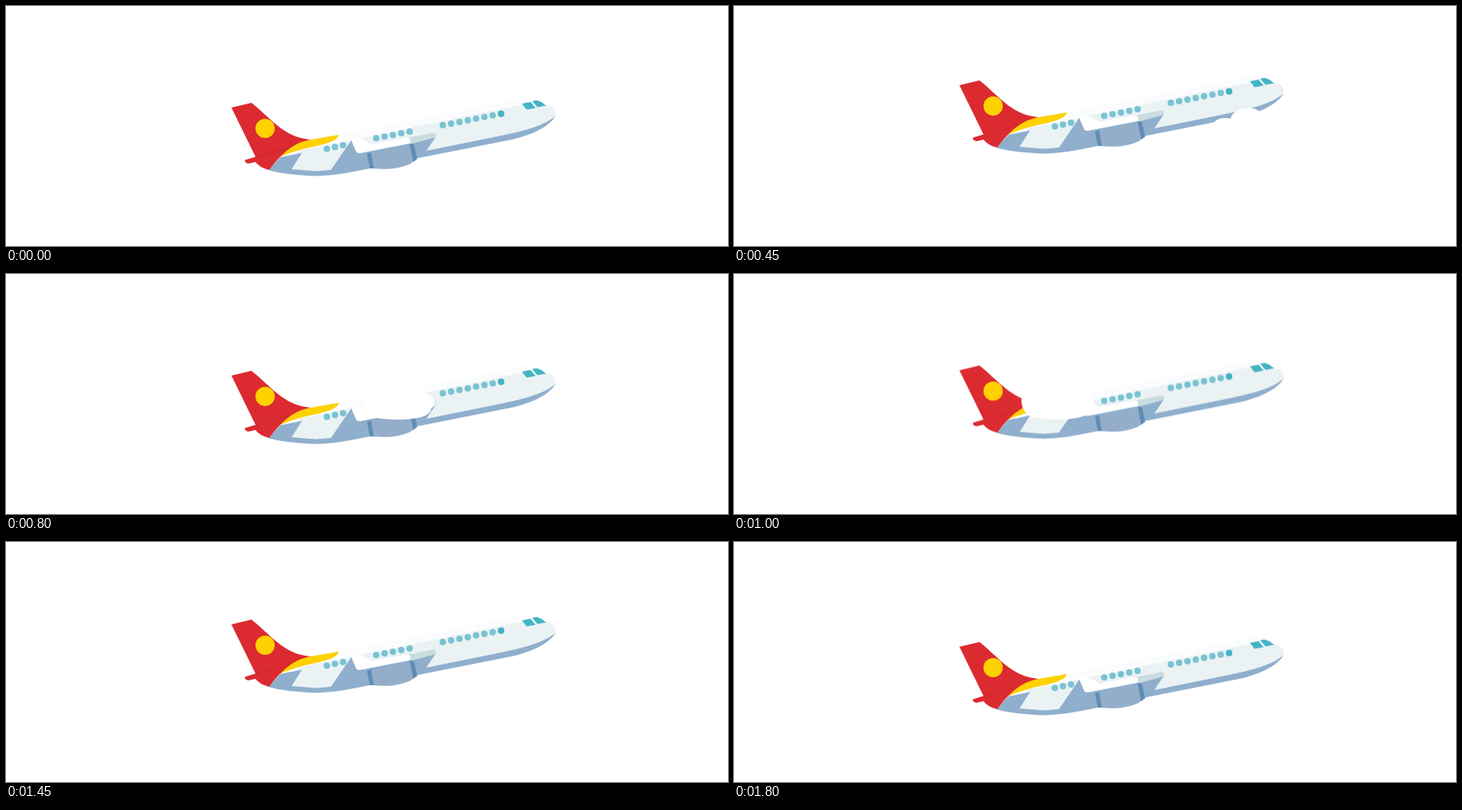
Recreate the animation shown at these times as an HTML page without scripts. Size 900 by 300 pixels, loop 1850 ms.

```html
<!DOCTYPE html>
<html lang="en">
<head>
<meta charset="utf-8">
<title>Climbing plane</title>
<style>
  html, body { margin: 0; width: 100%; height: 100%; overflow: hidden; background: #fff; }
  svg { display: block; width: 900px; height: 300px; }

  .plane { animation: bob 1850ms infinite; }
  .cloud { fill: #fff; animation: drift 1850ms steps(37) infinite; }

  .white { fill: #fbfcfd; }
  .light { fill: #eaf2f4; }
  .blue { fill: #8fafcd; }
  .engine { fill: #94aeca; }
  .dark { fill: #5f8db5; }
  .red { fill: #dc2a31; }
  .yellow { fill: #fed100; }
  .teal { fill: #45b4c4; }
  .windows { fill: none; stroke: #79c3d2; stroke-width: 8; stroke-linecap: round; stroke-dasharray: 0 1; }

  /* 37 ticks of 50 ms */
  @keyframes bob {
    0% { transform: translateY(0); animation-timing-function: steps(8); }
    21.6216% { transform: translateY(-28px); animation-timing-function: steps(1); }
    24.3243% { transform: translateY(-28px); animation-timing-function: steps(8); }
    45.9459% { transform: translateY(4px); animation-timing-function: steps(9); }
    70.2703% { transform: translateY(-28px); animation-timing-function: steps(1); }
    75.6757% { transform: translateY(-28px); animation-timing-function: steps(8); }
    97.2973%, 100% { transform: translateY(4px); animation-timing-function: steps(1); }
  }
  @keyframes drift {
    from { transform: translateX(342.4px); }
    to { transform: translateX(-449.4px); }
  }
</style>
</head>
<body>
<svg viewBox="0 0 900 300">
  <g class="plane">
    <!-- fuselage -->
    <path class="white" d="M330 203 L342 180 L380 167 L414 161 L640 116 C656 112 667 116 674 124 L640 150 L524 181 L386 206Z"/>
    <path class="light" d="M365 181 L441 165.500 L640 124 L674 123.500 C682 126 687 131 685 138 C672 150 655 155 620 162 L524 182 L405 206 L386 208 L354 206Z"/>
    <path class="blue" d="M342 189 L369 183.500 L356 204 L386 206.500 L405 205 L431 167 L440 184 L503 172 L536 163 L524 181 L620 161.500 C655 154 672 148 685 137.500 C678 150 655 163 620 169 L512 190.500 L456 202.500 C425 209 405 212.500 385 212.500 C355 211 338 208.500 327 205Z"/>

    <!-- wing and engine -->
    <path fill="#cadcdf" d="M500 165 L532 158.500 Q537 158 536 164 L503 173Z"/>
    <path class="engine" d="M453 184 L506 172 L512 191 C500 204 475 205 456 203Z"/>
    <path class="dark" d="M450 185 L455 183 L458.500 203 L453.500 203Z M503 172 L508.500 173 L512.500 191.500 L507.500 195Z"/>
    <path fill="#fff" d="M430 167 L441 165 L456 173 L499 164.500 Q505 164 504 171.500 L441 184 Q437 184.500 436 181Z"/>

    <!-- windows -->
    <g class="windows">
      <path pathLength="2.01" d="M400 178.500 L420.200 174"/>
      <path pathLength="4.01" d="M461.500 165.300 L503.200 157"/>
      <path pathLength="7.01" d="M544.500 149 L617.200 134.700"/>
    </g>
    <circle class="teal" cx="617.200" cy="134.700" r="4"/>
    <path class="teal" d="M643 122 L654 120 L660 127.500 L649 129.500Z M656 119 Q661 117 665 119 Q670 121 673 124.500 L662.500 126.500Z"/>

    <!-- tail -->
    <path class="yellow" d="M341 189 C350 175 362 170 380 167 L415 161 C412 172 384 175 370 179 C360 181.500 350 185 341 189Z"/>
    <path class="red" d="M281 127 L306 121 C327 137 346 165 380 167 C360 171 347 180 328 205 Q316 202 311 195 L302 197 Q297 196 298 192.500 L311 188.500Z"/>
    <path fill="none" stroke="#c9242c" stroke-width=".8" d="M311 189 L353 177"/>
    <circle class="yellow" cx="323" cy="153" r="12"/>
  </g>

  <path class="cloud" d="M462 180 C450 178 443 168 444 156 C445 141 460 138 469 141 C473 126 499 124 506 133 C515 133 520 140 518 148 C535 151 539 164 530 168 C530 177 514 182 488 182 C478 182 470 181 462 180Z"/>
</svg>
</body>
</html>
```
